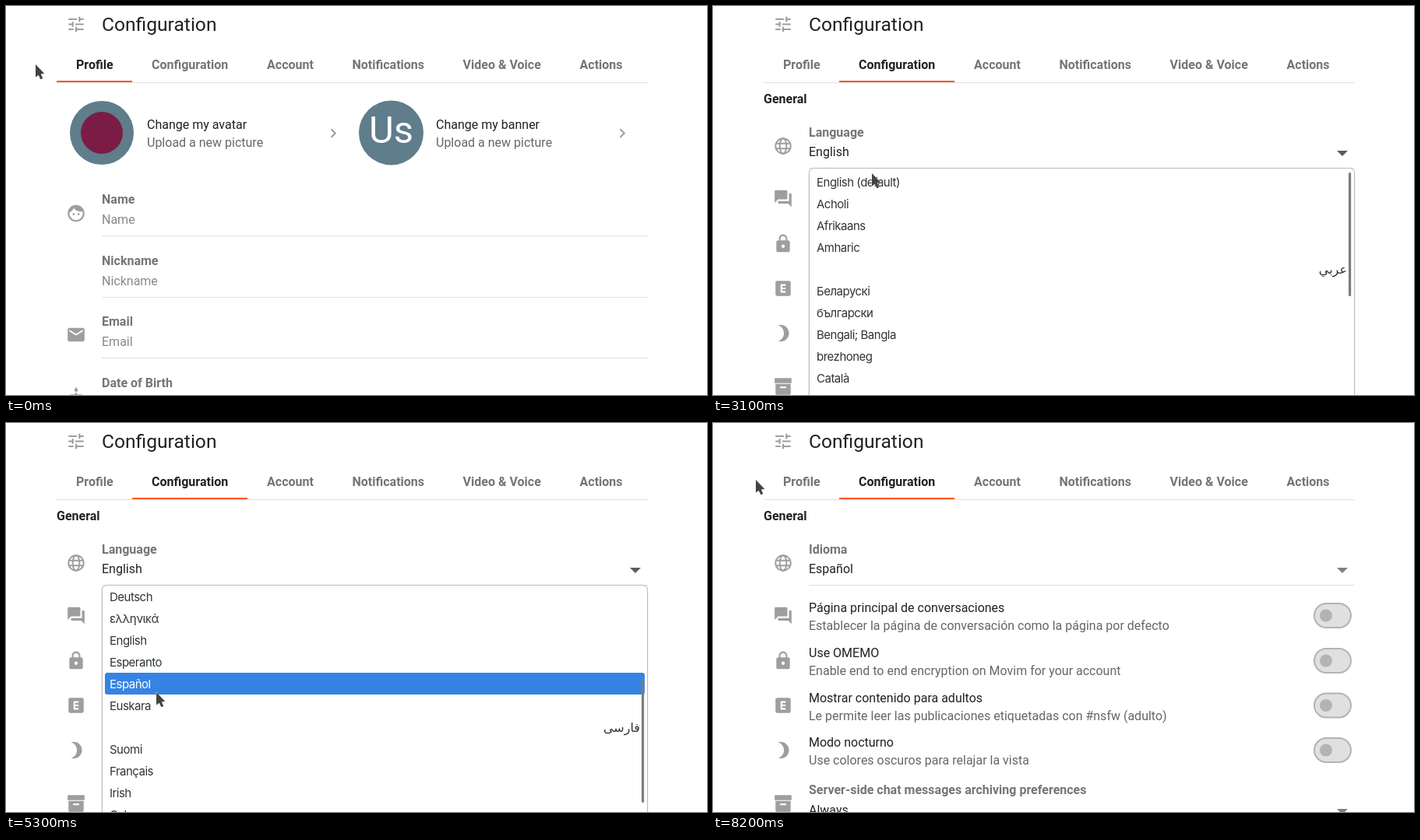
Recreate the animation shown at these times as an HTML page. Size 900 px wide and 500 px high, loop 9700 ms.

```html
<!DOCTYPE html>
<html lang="en">
<head>
<meta charset="utf-8">
<title>Configuration</title>
<style>
html, body { margin: 0; width: 100%; height: 100%; overflow: hidden; background: #fff; }
svg { display: block; width: 900px; height: 500px; }
text { font: 16px Roboto, sans-serif; white-space: pre; }
.b { font-weight: 700; }
.row { font: 15px Inter, "DejaVu Sans", sans-serif; letter-spacing: -.5px; }
.rtl { font: 16px "DejaVu Sans", sans-serif; text-anchor: end; }
</style>
</head>
<body>
<svg id="stage" viewBox="0 0 900 500"></svg>
<script>
const LOOP = 9700, STEP = 100;
const DARK = '#212121', MID = '#666', LABEL = '#757575', PALE = '#888', LINE = '#e0e0e0', ICON = '#9e9e9e';

const tabs = [['Profile', 65, 162], ['Configuration', 162, 310], ['Account', 310, 419.5],
  ['Notifications', 419.5, 561.5], ['Video &amp; Voice', 561.5, 711.5], ['Actions', 711.5, 816]];

const languages = ['English (default)', 'Acholi', 'Afrikaans', 'Amharic', 'عربي', 'Беларускі', 'български',
  'Bengali; Bangla', 'brezhoneg', 'Català', 'čeština', 'Dansk', 'Deutsch', 'ελληνικά', 'English', 'Esperanto',
  'Español', 'Euskara', 'فارسی', 'Suomi', 'Français', 'Irish', 'Galego'];

const options = [
  [243, 'forum', 'Main chat page', 'Make the chat page as the default one',
    'Página principal de conversaciones', 'Establecer la página de conversación como la página por defecto'],
  [301, 'lock', 'Use OMEMO', 'Enable end to end encryption on Movim for your account'],
  [358.5, 'explicit', 'Display adult content', 'Will allow you to read the posts tagged with the #nsfw tag',
    'Mostrar contenido para adultos', 'Le permite leer las publicaciones etiquetadas con #nsfw (adulto)'],
  [416, 'moon', 'Night Mode', 'Use dark colors to rest your eyes',
    'Modo nocturno', 'Use colores oscuros para relajar la vista']];

const icons = {
  tune: 'M3 17v2h6v-2H3zM3 5v2h10V5H3zm10 16v-2h8v-2h-8v-2h-2v6h2zM7 9v2H3v2h4v2h2V9H7zm14 4v-2H11v2h10zm-6-4h2V7h4V5h-4V3h-2v6z',
  face: 'M7.75 13a1.25 1.25 0 1 0 2.5 0a1.25 1.25 0 1 0-2.5 0zm6 0a1.25 1.25 0 1 0 2.5 0a1.25 1.25 0 1 0-2.5 0zM12 2C6.48 2 2 6.48 2 12s4.48 10 10 10 10-4.48 10-10S17.52 2 12 2zm0 18c-4.41 0-8-3.59-8-8 0-.29.02-.58.05-.86 2.36-1.05 4.23-2.98 5.21-5.37C11.07 8.33 14.05 10 17.42 10c.78 0 1.53-.09 2.25-.26.21.71.33 1.47.33 2.26 0 4.41-3.59 8-8 8z',
  mail: 'M20 4H4c-1.1 0-2 .9-2 2v12c0 1.1.9 2 2 2h16c1.1 0 2-.9 2-2V6c0-1.1-.9-2-2-2zm0 4l-8 5-8-5V6l8 5 8-5v2z',
  cake: 'M12 6c1.1 0 2-.9 2-2 0-.4-.1-.7-.3-1L12 0l-1.7 3c-.2.3-.3.6-.3 1 0 1.1.9 2 2 2zM18 9h-5V7h-2v2H6c-1.7 0-3 1.3-3 3v10h18V12c0-1.7-1.3-3-3-3z',
  forum: 'M21 6h-2v9H6v2c0 .55.45 1 1 1h11l4 4V7c0-.55-.45-1-1-1zm-4 6V3c0-.55-.45-1-1-1H3c-.55 0-1 .45-1 1v14l4-4h10c.55 0 1-.45 1-1z',
  lock: 'M18 8h-1V6c0-2.76-2.24-5-5-5S7 3.24 7 6v2H6c-1.1 0-2 .9-2 2v10c0 1.1.9 2 2 2h12c1.1 0 2-.9 2-2V10c0-1.1-.9-2-2-2zm-6 9c-1.1 0-2-.9-2-2s.9-2 2-2 2 .9 2 2-.9 2-2 2zm3.1-9H8.9V6c0-1.71 1.39-3.1 3.1-3.1 1.71 0 3.1 1.39 3.1 3.1v2z',
  explicit: 'M19 3H5c-1.1 0-2 .9-2 2v14c0 1.1.9 2 2 2h14c1.1 0 2-.9 2-2V5c0-1.1-.9-2-2-2zm-4 6h-4v2h4v2h-4v2h4v2H9V7h6v2z',
  moon: 'M9 2c-1.05 0-2.05.16-3 .46 4.06 1.27 7 5.06 7 9.54 0 4.48-2.94 8.27-7 9.54.95.3 1.95.46 3 .46 5.52 0 10-4.48 10-10S14.52 2 9 2z',
  archive: 'M3 2h18q1 0 1 1v5H2V3q0-1 1-1zM3 9h18v11q0 2-2 2H5q-2 0-2-2zM8.5 12v2h7v-2z'
};

// Pointer moves: first step, last step, x, y reached at the last step
const moves = [[400, 800, 243, 85], [1900, 2400, 204, 186], [3100, 3100, 204, 215], [3500, 3500, 204, 186],
  [3800, 3800, 208, 229], [4000, 4200, 204, 247], [4700, 4700, 204, 317], [5200, 5300, 193, 346],
  [5700, 5700, 193, 344], [5900, 6000, 197, 333], [7400, 7800, 49, 82], [7900, 8000, 55, 73]];

const within = (t, a, b) => t >= a && t < b;

function pointerAt(t) {
  let x = 38, y = 75;
  for (const [a, b, tx, ty] of moves) {
    const p = Math.min(1, Math.max(0, (t - a + STEP) / (b - a + STEP)));
    const e = p * p * (3 - 2 * p);
    x += (tx - x) * e;
    y += (ty - y) * e;
  }
  return [x, y];
}

const text = (x, y, s, fill = DARK, cls = '', more = '') =>
  `<text x="${x}" y="${y}" fill="${fill}" class="${cls}" ${more}>${s}</text>`;
const rect = (x, y, w, h, fill, more = '') =>
  `<rect x="${x}" y="${y}" width="${w}" height="${h}" fill="${fill}" ${more}/>`;
const circle = (x, y, r, fill) => `<circle cx="${x}" cy="${y}" r="${r}" fill="${fill}"/>`;
const path = (d, fill, more = '') => `<path d="${d}" fill="${fill}" ${more}/>`;
const iconAt = y => `transform="translate(77 ${y - 13}) scale(1.083)"`;
const icon = (name, y) => path(icons[name], ICON, `fill-rule="evenodd" ${iconAt(y)}`);
const rule = y => rect(123, y, 701, 1, LINE);
const caret = (y, fill) => path(`M801 ${y}h14l-7 7z`, fill);

function header(active, hover, bar) {
  let s = icon('tune', 23.5) + text(123, 32, 'Configuration', DARK, '', 'style="font-size:24.6px"');
  s += rect(65, 98, 759, 1, LINE);
  tabs.forEach(([name, a, b], i) => {
    if (i === active) s += rect(a, 96, b - a, 2, '#ff5722');
    if (i === hover) s += path(`M${a} 98V61q0-8 8-8H${b - 8}q8 0 8 8V98z`, 'rgba(0,0,0,.04)');
    s += text(a + 25, 81, name, i === active ? DARK : LABEL, 'b');
  });
  if (bar) s += rect(67, 94, 650, 3, 'rgba(0,0,0,.2)', 'rx="1"');
  return s;
}

function upload(x, title) {
  return text(x, 158, title) + text(x, 181, 'Upload a new picture', MID) +
    path(`M${x + 236.5} 158.2l5.3 5.3-5.3 5.3`, 'none', `stroke="${ICON}" stroke-width="2"`);
}

function profile() {
  let s = circle(123, 163, 41, '#607d8b') + circle(123, 163, 27, '#7b1c46') + upload(181, 'Change my avatar');
  s += circle(494.5, 163, 41.5, '#607d8b') + upload(552, 'Change my banner');
  s += text(494.5, 176, 'Us', '#fff', '', 'text-anchor="middle" style="font-size:49px"');
  ['Name', 'Nickname', 'Email', 'Date of Birth'].forEach((name, i) => {
    const y = Math.round(254 + i * 78.6);
    s += text(123, y, name, LABEL, 'b') + text(123, y + 26, name, PALE) + rule(y + 41);
  });
  return s + icon('face', 266.5) + icon('mail', 422.5) + icon('cake', 502.5);
}

function settings(lang, value, hot) {
  let s = text(65, 125, 'General', DARK, 'b');
  s += `<g ${iconAt(180)} fill="none" stroke="${ICON}" stroke-width="1.8"><circle cx="12" cy="12" r="9"/>` +
    '<ellipse cx="12" cy="12" rx="4" ry="9"/><path d="M4 9h16M4 15h16"/></g>';
  s += text(123, 168, lang ? 'Idioma' : 'Language', LABEL, 'b') + text(123, 193, value);
  s += caret(186, hot ? '#5c5c5c' : '#808080') + rule(208);
  for (const [y, name, ...words] of options) {
    const k = lang && words.length > 2 ? 2 : 0;
    s += icon(name, y + 4.5) + text(123, y, words[k]) + text(123, y + 23, words[k + 1], MID);
    s += rect(772, y - 11, 47, 31, LINE, 'rx="15.5" stroke="#b3b3b3" stroke-width="2"') + circle(787, y + 4.5, 8, '#b3b3b3');
  }
  return s + icon('archive', 489) + text(123, 477, 'Server-side chat messages archiving preferences', LABEL, 'b') +
    text(123, 503, 'Always') + caret(496, '#808080');
}

function popup(scroll, chosen) {
  let s = rect(122, 207.5, 703, 320, 'rgba(0,0,0,.06)', 'rx="7"');
  s += rect(123.5, 208.5, 700, 320, '#fff', 'rx="6" stroke="#bdbdbd"');
  languages.forEach((name, i) => {
    const y = 212 + i * 28 - scroll;
    if (y < 205 || y > 500) return;
    const on = i === chosen, rtl = /[\u0600-\u06ff]/.test(name);
    if (on) s += rect(127, y, 693, 28, '#3584e4', 'rx="3"');
    s += text(rtl ? 814 : 133, y + 19.5, name, on ? '#fff' : '#2e3436', rtl ? 'rtl' : 'row');
  });
  return s + rect(816, 214 + scroll * .339, 3.2, 159, '#7a7d7e', 'rx="1.6"');
}

function pointer(x, y, hand) {
  const d = hand
    ? 'M-2 1q0-2 2-2t2 2v6l7 1.2q2 .4 2 2.5v3l-1 6.3h-9l-6-7.5q-1-1.5.3-2.3 1.2-.6 2.7.8z'
    : 'M0 0V16.5l3.7-2.8 2.7 5.6 2.9-1.3-2.5-5.5 4.4-.8z';
  return path(d, '#434343', `transform="translate(${x} ${y})" stroke="#fff" stroke-opacity=".8" paint-order="stroke"`);
}

function scene(t) {
  const [x, y] = pointerAt(t);
  const hover = y > 53 && y < 98 ? tabs.findIndex(([, a, b]) => x >= a && x < b) : -1;
  const bar = within(t, 500, 2400) || within(t, 7700, 8200);
  const open = within(t, 3100, 3500) || within(t, 3600, 6200);
  let s = header(t < 1500 ? 0 : 1, hover, bar);
  s += t < 1500 ? profile() : settings(t >= 7400, t < 6300 ? 'English' : 'Español', within(t, 2300, 6200));
  if (open) {
    const scroll = t < 3800 ? 0 : t < 4700 ? 168 : 339;
    const chosen = within(t, 3800, 4400) ? 6 : within(t, 4500, 4700) ? 7 : t >= 5300 ? 16 : -1;
    s += popup(scroll, chosen);
  }
  return s + pointer(x, y, hover >= 0);
}

const stage = document.getElementById('stage');
const start = performance.now();
let last = -1;
function tick() {
  const t = Math.floor((performance.now() - start) % LOOP / STEP) * STEP;
  if (t !== last) stage.innerHTML = scene(last = t);
  requestAnimationFrame(tick);
}
tick();
</script>
</body>
</html>
```
